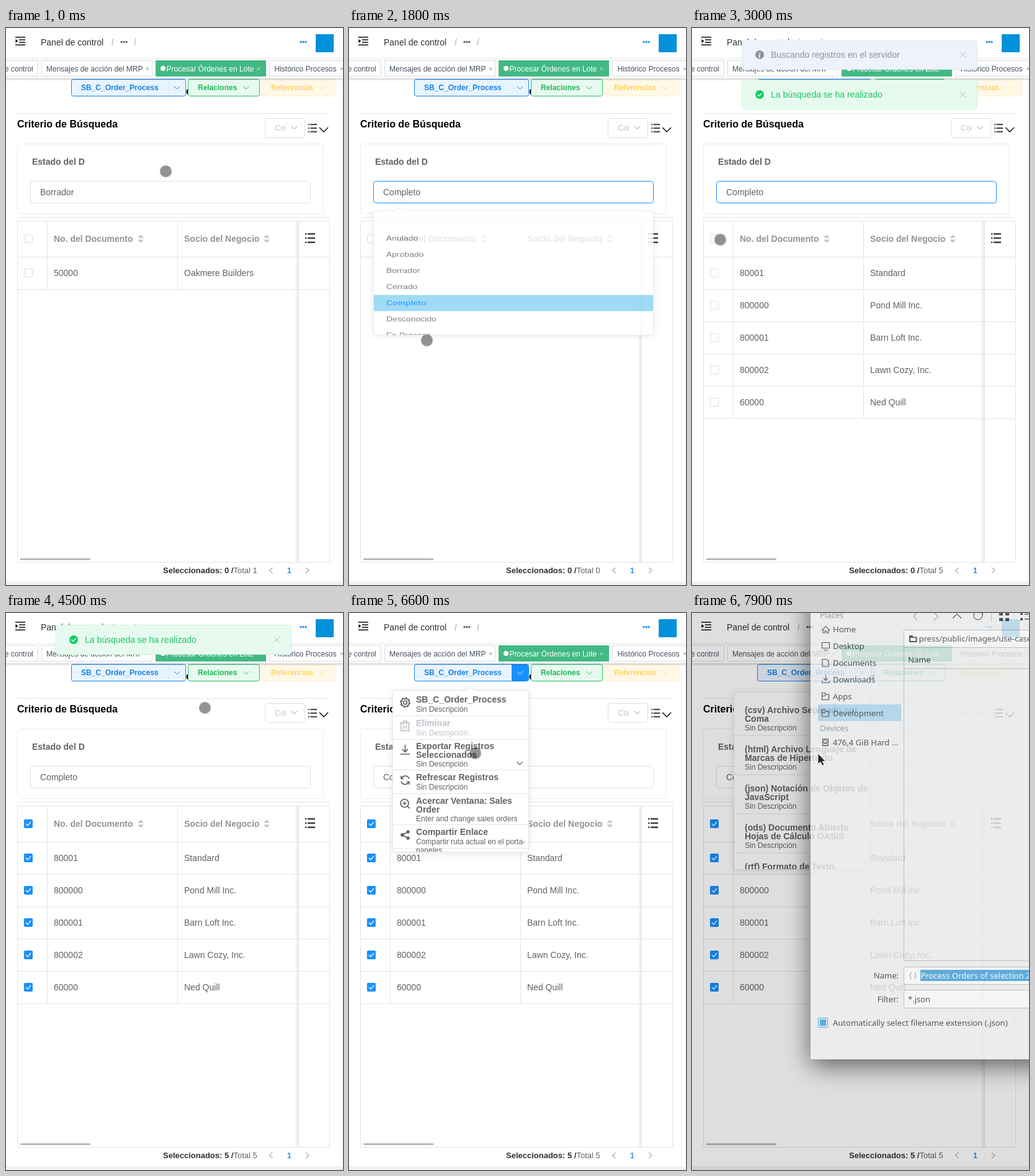
Animation of 543 by 896 pixels, one loop 8 s. Source, as an HTML page:

```html
<!DOCTYPE html>
<html lang="es">
<head>
<meta charset="utf-8">
<title>Procesar Órdenes en Lote</title>
<style>
html, body { margin: 0; width: 100%; height: 100%; overflow: hidden; background: #fff; }
svg { display: block; width: 543px; height: 896px; font: 14px "Liberation Sans", Arial, sans-serif; }
.b { font-weight: bold; }
.s12 { font-size: 12px; }
.s13 { font-size: 13px; }
.s16 { font-size: 16px; }
.t { fill: #606266; }
.mute { fill: #909399; }
.pale { fill: #c0c4cc; }
.ln { fill: none; stroke: #dfe6ec; }
.ic { fill: none; stroke: #606266; stroke-width: 1.7; }
.drop { fill: #fff; stroke: #e4e7ed; filter: drop-shadow(0 2px 6px rgba(0,0,0,.1)); }

/* timeline */
.pA, .pB, .pC, .pD, .pCD, .caret, .hot, .dlg { animation: 8s step-end infinite; }
.pA { animation-name: pA; }
.pB { animation-name: pB; }
.pC { animation-name: pC; }
.pD { animation-name: pD; }
.pCD { animation-name: pCD; }
.caret { animation-name: caret; }
.hot { animation-name: hot; }
.dlg { animation-name: dlg; }
@keyframes pA { 0% { visibility: visible } 22.5%, 100% { visibility: hidden } }
@keyframes pB { 0%, 33.75%, 100% { visibility: hidden } 22.5% { visibility: visible } }
@keyframes pC { 0%, 48.75%, 100% { visibility: hidden } 33.75% { visibility: visible } }
@keyframes pD { 0% { visibility: hidden } 48.75%, 100% { visibility: visible } }
@keyframes pCD { 0% { visibility: hidden } 33.75%, 100% { visibility: visible } }
@keyframes caret { 0%, 13.75%, 22.5%, 100% { visibility: hidden } 7.5%, 20% { visibility: visible } }
@keyframes hot { 0%, 92.5%, 100% { visibility: hidden } 66.25% { visibility: visible } }
@keyframes dlg { 0% { visibility: hidden } 98.75%, 100% { visibility: visible } }

.field { fill: #fff; animation: field 8s step-end infinite; }
@keyframes field { 0%, 48.75%, 100% { stroke: #dcdfe6 } 6.25% { stroke: #1890ff } }
.old { animation: old 8s step-end infinite; }
@keyframes old { 0% { fill: #606266 } 6.25% { fill: #c0c4cc } 22.5%, 100% { fill: transparent } }
.new { animation: new 8s step-end infinite; }
@keyframes new { 0% { fill: transparent } 22.5%, 100% { fill: #606266 } }

.zoom { animation: 8s cubic-bezier(.23,1,.32,1) infinite; }
#states { transform-origin: 0 294px; animation-name: states; }
@keyframes states {
  0%, 6% { transform: scaleY(0); opacity: 0 }
  10%, 22.48% { transform: none; opacity: 1 }
  22.5%, 23.7% { transform: scaleY(.765); opacity: .8 }
  23.75% { transform: scaleY(.1); opacity: .1 }
  25%, 100% { transform: scaleY(0); opacity: 0 }
}
#menu { transform-origin: 0 124px; animation-name: menu; }
@keyframes menu {
  0%, 66% { transform: scaleY(0); opacity: 0 }
  70%, 92% { transform: none; opacity: 1 }
  94%, 100% { transform: scaleY(0); opacity: 0 }
}
#formats { transform-origin: 0 127px; animation-name: formats; }
@keyframes formats {
  0%, 93% { transform: scaleY(0); opacity: 0 }
  97.5% { transform: scaleY(.995); opacity: 1 }
  98.7%, 99.99% { transform: none; opacity: 1 }
  100% { transform: scaleY(0); opacity: 0 }
}
#busy { animation: busy 8s ease infinite; }
@keyframes busy {
  0%, 23.75% { transform: translateY(-48px); opacity: 0 }
  28.5%, 50% { transform: none; opacity: 1 }
  53.75%, 100% { transform: translateY(-48px); opacity: 0 }
}
#done { animation: done 8s ease infinite; }
@keyframes done {
  0%, 33.2% { transform: translateY(16px); opacity: 0 }
  37.4%, 50.5% { transform: translateY(64px); opacity: 1 }
  55.5%, 71.25% { transform: none; opacity: 1 }
  75%, 100% { transform: translateY(-48px); opacity: 0 }
}
#touch { animation: move 8s ease-in-out infinite, press 8s step-end infinite; }
@keyframes move {
  0%, .7% { transform: translate(257.5px, 230.5px) }
  3.75%, 12% { transform: translate(193.5px, 279.5px) }
  20%, 24% { transform: translate(125.5px, 502.5px) }
  30%, 49% { transform: translate(45.5px, 340.5px) }
  56.25%, 58% { transform: translate(320.5px, 152.5px) }
  61.25%, 70% { transform: translate(280.5px, 96.5px) }
  76.25%, 77% { transform: translate(218.5px, 213.5px) }
  82.5%, 99.99% { transform: translate(203.5px, 225.5px) }
  100% { transform: translate(257.5px, 230.5px) }
}
@keyframes press {
  0%, 7.5%, 48.75%, 67.5%, 92.5% { opacity: .43 }
  6.25%, 46.25%, 66.25%, 91.25% { opacity: .58 }
  97.5%, 100% { opacity: 0 }
}
#dialog { opacity: .79; font: 13px "Noto Sans", sans-serif; fill: #31363b; }
#dialog .ic { stroke: #31363b; stroke-width: 1.1; }
#dialog .box { fill: #fcfcfc; stroke: #b4b7b9; }
</style>
</head>
<body>
<svg viewBox="0 0 543 896">
  <defs>
    <path id="dn" d="M-4.5-2L0 2.5 4.5-2" fill="none"/>
    <g id="sort" class="pale"><path d="M-5-1.5L0-6.5 5-1.5zM-5 1.5L0 6.5 5 1.5z"/></g>
    <path id="list" d="M0 0h2.4v2.6h-2.4zM4 0h12v2.6h-12zM0 6.7h2.4v2.6h-2.4zM4 6.7h12v2.6h-12zM0 13.4h2.4v2.6h-2.4zM4 13.4h12v2.6h-12z"/>
    <rect id="box" x="-6.5" y="-6.5" width="13" height="13" rx="1.5" fill="#fff" stroke="#dcdfe6"/>
    <g id="tick"><rect x="-7" y="-7" width="14" height="14" rx="2" fill="#1890ff"/><path d="M-4 0l3 3 5-6" fill="none" stroke="#fff" stroke-width="1.2"/></g>
    <path id="x" d="M-5-5L5 5M5-5L-5 5" stroke="#b8bcc5" fill="none"/>
    <path id="x2" d="M-2-2L2 2M2-2L-2 2" fill="none"/>
    <path id="dots" d="M-4 0h.01M0 0h.01M4 0h.01" stroke-width="3.4" stroke-linecap="round"/>
    <path id="folder" d="M-5.5 5.5v-11h4.5l1.5 2.5h5v8.500zM-5.5-.5h4l2-2.500h5" class="ic"/>
    <linearGradient id="shade"><stop offset="0" stop-opacity="0"/><stop offset="1" stop-opacity=".1"/></linearGradient>
    <linearGradient id="under" x2="0" y2="1"><stop offset="0" stop-opacity=".18"/><stop offset="1" stop-opacity="0"/></linearGradient>
    <clipPath id="cStates"><path d="M39 294h452v261h-452z"/></clipPath>
    <clipPath id="cMenu"><path d="M70 124h220v260h-220z"/></clipPath>
    <clipPath id="cFormats"><path d="M67 127h220v285h-220z"/></clipPath>
    <clipPath id="cCol"><path d="M430 150h21v22h-21z"/></clipPath>
  </defs>

  <rect width="543" height="896" fill="#fff"/>
  <path d="M542 84h1v812h-1zM0 890h543v6h-543z" fill="#f1f1f1"/>

  <!-- action buttons -->
  <text class="b s16" x="290" y="107">e</text>
  <g class="b s12" stroke-width="1">
    <rect x="105.500" y="82.500" width="184" height="27" rx="3" fill="#e8f4ff" stroke="#1785e8"/>
    <path d="M262.500 86v20" stroke="#d4e8fb"/>
    <text x="121" y="100" fill="#1682e6">SB_C_Order_Process</text>
    <use href="#dn" x="275.500" y="96" stroke="#1682e6"/>
    <g class="hot"><path d="M262 83h24q3 0 3 3v20q0 3-3 3h-24z" fill="#1890ff"/><use href="#dn" x="275.500" y="96" stroke="#fff"/></g>
    <rect x="293.500" y="82.500" width="115" height="27" rx="3" fill="#e7faf0" stroke="#1fbf5c"/>
    <text x="309" y="100" fill="#1fb955">Relaciones</text>
    <use href="#dn" x="387" y="96" stroke="#1fb955"/>
    <rect x="411.500" y="82.500" width="120" height="27" rx="3" fill="#fff8e6" stroke="#fff1cc"/>
    <text x="427" y="100" fill="#ffd566">Referencias</text>
    <use href="#dn" x="509.500" y="96" stroke="#ffd566"/>
  </g>

  <!-- header and tabs -->
  <rect width="543" height="81" fill="#fff"/>
  <rect y="81" width="543" height="4" fill="url(#under)"/>
  <path d="M0 81.500h543" stroke="#d3d6dd"/>
  <rect y="48" width="543" height="4" fill="url(#under)" opacity=".35"/>
  <path d="M15 14.700h16M21 19h10M21 23h10M15 27.300h16" stroke="#111" stroke-width="1.600"/>
  <path d="M15.500 18l4 3-4 3z"/>
  <text x="56" y="28" fill="#303133">Panel de control</text>
  <text class="b pale" x="170" y="28">/</text><text class="b pale" x="206" y="28">/</text>
  <use href="#dots" x="190" y="22.500" stroke="#606266"/>
  <use href="#dots" x="479" y="22.500" stroke="#1890ff"/>
  <rect x="499" y="10" width="29" height="29" fill="#0091da"/>
  <g class="s12" fill="#495060" stroke="none">
    <path d="M-50.500 52.500h102v25h-102zM57.500 52.500h178v25h-178zM424.500 52.500h150v25h-150z" fill="#fff" stroke="#d8dce5"/>
    <rect x="241" y="52" width="178" height="26" fill="#42b983"/>
    <text x="-43" y="70">Panel de control</text>
    <text x="65" y="70">Mensajes de acción del MRP</text>
    <circle cx="253" cy="65" r="4" fill="#fff"/>
    <text x="258.500" y="70" fill="#fff">Procesar Órdenes en Lote</text>
    <text x="432.500" y="70">Histórico Procesos</text>
    <g stroke="#7b818c"><use href="#x2" x="228" y="65.500"/><use href="#x2" x="541" y="65.500"/></g>
    <use href="#x2" x="407" y="65.500" stroke="#d5f0e4"/>
  </g>

  <!-- search criteria -->
  <path class="ln" d="M18 137.500h504M18 304.500h504"/>
  <text class="b s16" x="18" y="160">Criterio de Búsqueda</text>
  <rect x="417.500" y="145.500" width="64" height="31" rx="4" fill="#fff" stroke="#dcdfe6"/>
  <text class="pale s13" x="433" y="165" clip-path="url(#cCol)">Columnas</text>
  <use href="#dn" x="464.500" y="160" stroke="#b9bdc6" stroke-width="1.200"/>
  <use href="#list" transform="translate(487 154) scale(.88)" fill="#4d4f52"/>
  <path d="M505 160l7 7 7-7" fill="none" stroke="#000" stroke-width="1.300"/>
  <rect x="18.500" y="186.500" width="493" height="112" rx="4" fill="#fff" stroke="#e6ebf5"/>
  <text class="b t" x="42" y="220">Estado del D</text>
  <rect class="field" x="39.500" y="246.500" width="451" height="35" rx="4"/>
  <text class="old" x="55" y="269">Borrador</text>
  <text class="new" x="55" y="269">Completo</text>
  <path class="caret" d="M55.500 256v16" stroke="#333"/>

  <!-- table -->
  <rect x="465" y="311" width="7" height="548" fill="url(#shade)"/>
  <path class="ln" d="M18.500 310.500h503v549h-503zM18 368.500h504M66.500 310v58M276.500 310v58"/>
  <text class="b mute" x="77" y="344">No. del Documento</text><use href="#sort" x="217" y="339"/>
  <text class="b mute" x="287" y="344">Socio del Negocio</text><use href="#sort" x="420" y="339"/>
  <use href="#list" x="482" y="330" fill="#3c3e42"/>
  <use href="#box" x="36" y="339"/><use class="pD" href="#tick" x="36" y="339"/>
  <g id="one" class="pA"></g>
  <g id="five" class="pCD"></g>
  <g id="ticks" class="pD"></g>
  <rect x="23" y="853" width="113" height="3" rx="1" fill="#b9babc"/>
  <g id="foot" class="s13"></g>
  <path d="M429.500 868l-5 4.500 5 4.500M483 868l5 4.500-5 4.500" fill="none" stroke="#a9adb5" stroke-width="1.200"/>
  <text class="b s12" x="453" y="877" fill="#1890ff">1</text>

  <!-- status list -->
  <g id="states" class="zoom">
    <path class="drop" d="M43 294.500h32l6-6 6 6h400q3.500 0 3.500 3.500v254q0 3.500-3.500 3.500h-444q-3.500 0-3.500-3.500v-254q0-3.500 3.500-3.500z"/>
    <g id="opts" clip-path="url(#cStates)"></g>
  </g>

  <!-- action menu -->
  <g id="menu" class="zoom">
    <path class="drop" d="M74 124.500h116.500l6-5 6 5h83.500q3.500 0 3.500 3.500v253q0 3.500-3.500 3.500h-212q-3.500 0-3.500-3.500v-253q0-3.500 3.500-3.500z"/>
    <g clip-path="url(#cMenu)">
      <g id="acts"></g>
      <use href="#dn" x="275" y="241.500" stroke="#606266" stroke-width="1.200"/>
      <g class="ic">
        <circle cx="90.500" cy="144" r="6.500"/><circle cx="90.500" cy="144" r="3"/>
        <circle cx="90.500" cy="144" r="7.600" stroke-dasharray="3 2.970"/>
        <path d="M82 177h16M84 177v12.500h12.500v-12.500M87.500 177v-3h5.500v3M88.500 180.500v5.500M92 180.500v5.500" stroke="#b5b8be" stroke-width="1.500"/>
        <path d="M90.500 212v11M86 219l4.500 4.500 4.500-4.500M83 227h15"/>
        <path d="M84 271a6.500 6.500 0 0 0 12 1M97 267a6.500 6.500 0 0 0-12-1.500M84 262v4.500h4.500M97 276v-4.500h-4.500"/>
        <circle cx="89.500" cy="306" r="6.500"/><path d="M94 310.500l4 4M86.500 306h6M89.500 303v6"/>
        <path d="M95 352l-9 5 9 5"/>
      </g>
      <g class="t"><circle cx="95" cy="352" r="2.700"/><circle cx="86" cy="357" r="2.900"/><circle cx="95" cy="362" r="2.700"/></g>
    </g>
  </g>

  <!-- export formats -->
  <g id="formats" class="zoom">
    <path class="drop" d="M71 127.500h119.500l6-5 6 5h80.500q3.500 0 3.500 3.500v278q0 3.500-3.500 3.500h-212q-3.500 0-3.500-3.500v-278q0-3.500 3.500-3.500z"/>
    <g id="exts" clip-path="url(#cFormats)"></g>
  </g>

  <!-- messages -->
  <g id="busy">
    <rect x="80.500" y="19.500" width="379" height="47" rx="4" fill="#edf2fc" stroke="#e4e9f4"/>
    <circle cx="109" cy="43" r="7" class="mute"/>
    <text x="107" y="47.500" style="font:italic bold 12px 'Liberation Serif',serif" fill="#fff">i</text>
    <text class="mute" x="127" y="48">Buscando registros en el servidor</text><use href="#x" x="436" y="43"/>
  </g>
  <g id="done">
    <rect x="80.500" y="19.500" width="379" height="47" rx="4" fill="#e7faf0" stroke="#d0f2e0"/>
    <circle cx="109" cy="43" r="7" fill="#13ce66"/>
    <path d="M105.500 43l2.500 2.500 4.500-4.500" fill="none" stroke="#fff" stroke-width="1.400"/>
    <text x="127" y="48" fill="#1cc45f">La búsqueda se ha realizado</text><use href="#x" x="436" y="43"/>
  </g>

  <circle id="touch" r="9.500"/>

  <!-- save dialog -->
  <g class="dlg">
    <rect width="543" height="896" opacity=".13"/>
    <g id="dialog">
      <rect x="191" y="-60" width="420" height="778" fill="#eff0f1" style="filter:drop-shadow(0 10px 20px rgba(0,0,0,.75))"/>
      <path class="ic" d="M363-1l-6 6.500 6 6.500M390-1l6 6.500-6 6.500" opacity=".55"/>
      <path class="ic" d="M420 8.500l7-7 7 7M455 0a7 7 0 1 0 11-1M468 5v-6h-6"/>
      <path d="M482.500 0v14" stroke="#b4b7b9"/>
      <path d="M495 0h6v4h-6zM505 0h6v4h-6zM495 8h6v5h-6zM505 8h6v5h-6zM529 0h4v3h-4zM536 1h7v1.500h-7zM529 8h4v4h-4zM536 9h7v1.500h-7z"/>
      <rect class="box" x="341.500" y="27.500" width="220" height="28"/>
      <path d="M350 47v-11h5l2 2.500h5.500v8.500zM352 40v5h8.500v-5z" fill-rule="evenodd"/>
      <text x="365.500" y="46">press/public/images/use-cases</text>
      <path d="M341.500 56v503.500h202M342 89.500h201" fill="none" stroke="#b4b7b9"/>
      <text x="348" y="80">Name</text>
      <rect x="203" y="147" width="134" height="27" fill="#aad5ee"/>
      <g id="places"></g>
      <path class="ic" d="M209 28l6.500-6.500 6.500 6.500M211 27v5h3v-3h3v3h3v-5M209.500 47.500h12v9h-12zM212 59.500h7M210 74.500h7l3 3v8.500h-10zM215.500 100v8M212 105l3.500 3.500 3.500-3.500M209.500 109v3h12v-3M210.500 202.500h9v11h-9zM210 213h10M213 210l3-2"/>
      <circle class="ic" cx="215" cy="207" r="3"/>
      <use href="#folder" x="215" y="134"/><use href="#folder" x="215" y="161"/>
      <g fill="#7f8c8d"><text x="206" y="8">Places</text><text x="206" y="190">Devices</text></g>
      <text x="333" y="588" text-anchor="end">Name:</text><text x="333" y="626" text-anchor="end">Filter:</text>
      <rect class="box" x="341.500" y="569.500" width="220" height="28" rx="2"/><rect class="box" x="341.500" y="606.500" width="220" height="29" rx="2"/>
      <path d="M354 578q-2 0-2 3t-1.500 2.500q1.500 0 1.500 2.500t2 3M358 578q2 0 2 3t1.500 2.500q-1.500 0-1.500 2.500t-2 3" fill="none" stroke="#8b7fae"/>
      <rect x="368" y="574" width="175" height="18" fill="#3da0dc"/>
      <text x="368.500" y="588" fill="#fff">Process Orders of selection 2</text>
      <text x="348" y="626">*.json</text>
      <rect x="203.500" y="651.500" width="15" height="15" rx="1" fill="#d6ebf7" stroke="#3da0dc"/><rect x="206" y="654" width="10" height="10" fill="#3da0dc"/>
      <text x="227" y="664">Automatically select filename extension (.json)</text>
    </g>
    <path d="M203 226v17l4-3.500 3 6 3-1.500-3-5.500h5z" fill="#222" stroke="#fff" stroke-width=".8"/>
  </g>
</svg>
<script>
const put = (id, list, draw) => { document.getElementById(id).innerHTML = list.map(draw).join(''); };
const text = (x, y, str, cls = '') => `<text class="${cls}" x="${x}" y="${y}">${str}</text>`;

const row = ([doc, who], i) => {
  const y = 394 + 52 * i;
  return `<path class="ln" d="M18 ${y + 26.5}h504M66.500 ${y - 26}v52M276.500 ${y - 26}v52"/>
    <use href="#box" x="36" y="${y}"/>` + text(77, y + 5, doc, 't') + text(287, y + 5, who, 't');
};
const orders = [['80001', 'Standard'], ['800000', 'Pond Mill Inc.'], ['800001', 'Barn Loft Inc.'],
  ['800002', 'Lawn Cozy, Inc.'], ['60000', 'Ned Quill']];
put('one', [['50000', 'Oakmere Builders']], row);
put('five', orders, row);
put('ticks', orders, (o, i) => `<use href="#tick" x="36" y="${394 + 52 * i}"/>`);

put('foot', [['pA', 0, 1], ['pB', 0, 0], ['pC', 0, 5], ['pD', 5, 5]], ([cls, n, total]) =>
  `<text class="${cls} t" x="253" y="877"><tspan class="b" fill="#303133">Seleccionados: ${n} /</tspan>Total ${total}</text>`);

// the chosen option swaps when the list closes
const picked = { Borrador: ['pA', 'pB'], Completo: ['pB', 'pA'] };
const names = ['Anulado', 'Aprobado', 'Borrador', 'Cerrado', 'Completo', 'Desconocido', 'En Proceso'];
put('opts', names, (name, i) => {
  const y = 335 + 34 * i, [on, off] = picked[name] || [];
  if (!on) return text(60, y + 22, name, 't');
  return text(60, y + 22, name, 't ' + off) + `<g class="${on}" fill="#1890ff">
    <rect x="40" y="${y}" width="450" height="34" fill="#88d3f2"/>${text(60, y + 22, name, 'b')}</g>`;
});

const item = (x, y, heads, note, cls) =>
  heads.map((h, i) => text(x, y + 14 * i, h, 'b ' + cls)).join('') +
  text(x, y + 14 * heads.length + 1 - (heads.length > 1), note, 's12 ' + cls);
const none = 'Sin Descripción';
put('acts', [
  [144, ['SB_C_Order_Process'], none],
  [182, ['Eliminar'], none, 'pale'],
  [219, ['Exportar Registros', 'Seleccionados'], none],
  [269, ['Refrescar Registros'], none],
  [307, ['Acercar Ventana: Sales', 'Order'], 'Enter and change sales orders'],
  [357, ['Compartir Enlace'], 'Compartir ruta actual en el porta-']
], ([y, heads, note, cls = 't']) => item(108, y, heads, note, cls) +
  `<path class="ln" d="M71 ${y + 7.5 + 14 * heads.length + (heads.length > 1 ? -2 : 0)}h218"/>`);
document.getElementById('acts').innerHTML += text(108, 386, 'papeles', 's12 t');

put('exts', [
  ['(csv) Archivo Separado por', 'Coma'],
  ['(html) Archivo Lenguaje de', 'Marcas de Hipertexto'],
  ['(json) Notación de Objetos de', 'JavaScript'],
  ['(ods) Documento Abierto', 'Hojas de Cálculo OASIS'],
  ['(rtf) Formato de Texto', 'Enriquecido']
], (heads, i) => item(85, 160.5 + 63 * i, heads, none, 't') + `<path class="ln" d="M68 ${197 + 63 * i}h218"/>`);

put('places', ['Home', 'Desktop', 'Documents', 'Downloads', 'Apps', 'Development'],
  (name, i) => text(227, 31 + 27 * i, name));
document.getElementById('places').innerHTML += text(227, 213, '476,4 GiB Hard ...');
</script>
</body>
</html>
```
